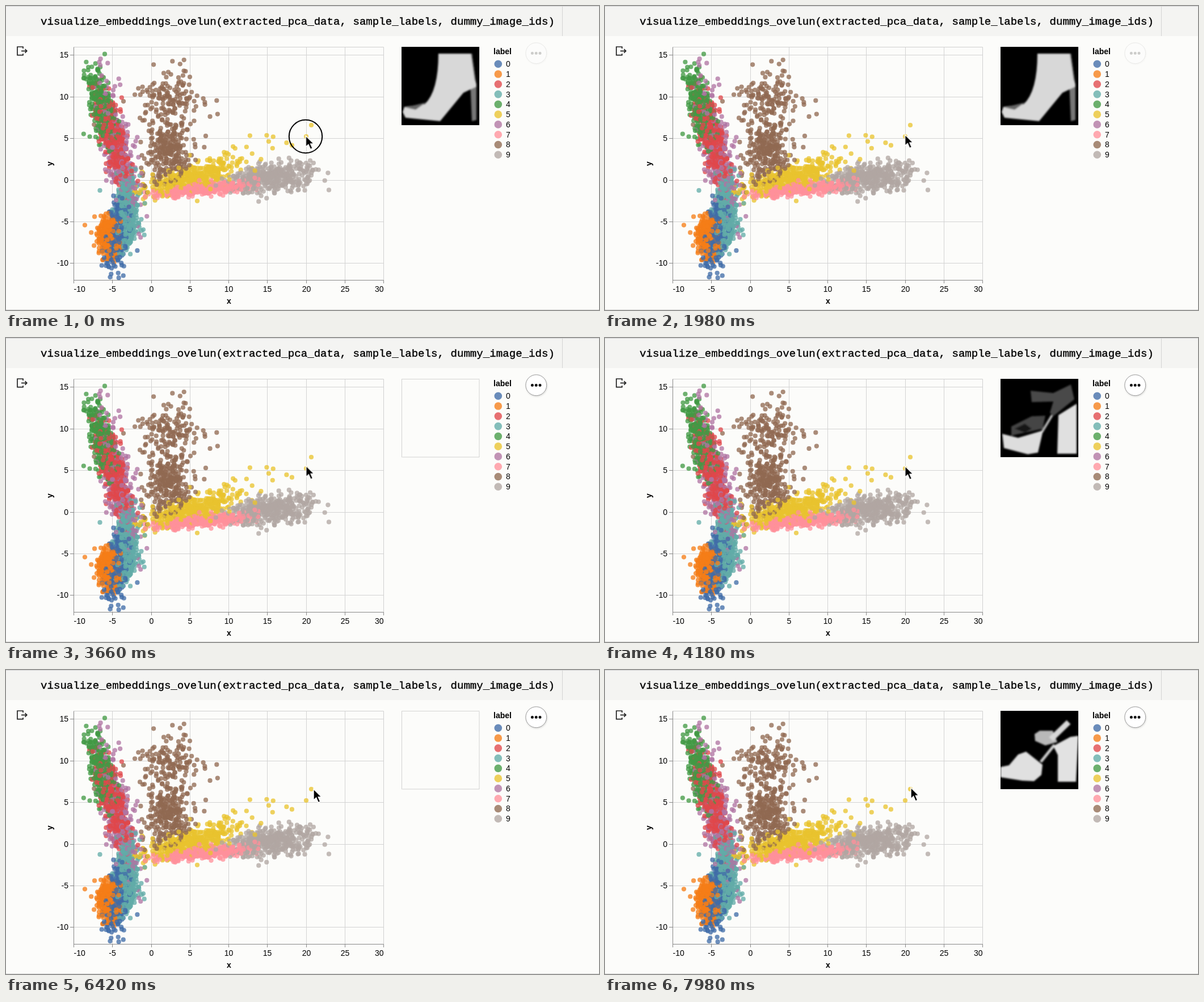
These frames come from a looping animation (1045 px wide and 536 px high, 8000 ms). An HTML page with a canvas:

```html
<!DOCTYPE html>
<html lang="en">
<head>
<meta charset="utf-8">
<title>Embedding scatter plot</title>
<style>
  html, body { margin: 0; width: 100%; height: 100%; overflow: hidden; background: #fcfcfa; }
  svg, canvas { position: absolute; left: 0; top: 0; width: 1045px; height: 536px; }
  text { font: 14px "Liberation Sans", Arial, sans-serif; fill: #000; }
  .bold { font-weight: bold; }
  .code { font: 19.13px "Liberation Mono", "Courier New", monospace; stroke: #000; stroke-width: .35; white-space: pre; }
  .photo { opacity: 0; }
</style>
</head>
<body>
<svg id="chart" viewBox="0 0 1045 536">
  <rect width="1045" height="53" fill="#f4f4f2"/>
  <path d="M0 .5H1045M980.5 0V53" stroke="#d4d4d4"/>
  <path d="M0 535.5H1045" stroke="#bbb" stroke-dasharray="1 1"/>
  <text class="code" x="61" y="33">visualize_embeddings_ovelun(extracted_pca_data, sample_labels, dummy_image_ids)</text>
  <path d="M30 75V72H20V86.7H30V84M27 79.3H36.5M33.5 76L36.8 79.3L33.5 82.6" fill="none" stroke="#222" stroke-width="1.7"/>
  <text class="bold" x="393" y="525" text-anchor="middle">x</text>
  <text class="bold" transform="translate(82 278) rotate(-90)" text-anchor="middle">y</text>
  <text class="bold" x="859" y="85">label</text>
</svg>
<canvas id="dots" width="1045" height="536"></canvas>
<svg viewBox="0 0 1045 536">
  <defs>
    <filter id="soft"><feGaussianBlur stdDeviation="1.6"/></filter>
    <clipPath id="thumb"><rect x="697" y="72" width="136.5" height="137.5"/></clipPath>
  </defs>
  <rect x="697.5" y="72.5" width="136.5" height="137.5" fill="none" stroke="#aaa" stroke-dasharray="1 1"/>

  <g id="boot" class="photo" clip-path="url(#thumb)">
    <rect x="697" y="72" width="137" height="138"/>
    <g filter="url(#soft)">
      <path d="M818 132L829 136V201L821 203Z" fill="#777"/>
      <path d="M762 84H821L829 142L806 153L765 203L704 197L699 187L702 178L738 173Q762 150 762 84Z" fill="#d8d8d8"/>
      <path d="M704 179L740 170L722 183Z" fill="#666"/>
      <path d="M820 84L827 132" stroke="#777" stroke-width="2"/>
    </g>
  </g>

  <g id="sandal" class="photo" clip-path="url(#thumb)">
    <rect x="697" y="72" width="137" height="138"/>
    <g filter="url(#soft)">
      <path d="M750 93L790 97L821 82L827 108L791 137L784 132L790 112L752 113Z" fill="#484848"/>
      <path d="M716 156L752 138L776 137L771 160L716 172Z" fill="#444"/>
      <path d="M722 160L740 151L752 160L740 167Z" fill="#191919"/>
      <path d="M770 166L788 136" stroke="#bbb" stroke-width="4"/>
      <path d="M700 169L728 176L772 163L763 202L745 205L703 194Z" fill="#ddd"/>
      <path d="M799 136L831 116V204H797Z" fill="#e0e0e0"/>
    </g>
  </g>

  <g id="mule" class="photo" clip-path="url(#thumb)">
    <rect x="697" y="72" width="137" height="138"/>
    <g filter="url(#soft)">
      <path d="M768 162L792 132" stroke="#ccc" stroke-width="5"/>
      <path d="M757 113L766 107L789 107L797 127L776 133L758 125Z" fill="#b8b8b8"/>
      <path d="M786 122L817 92" stroke="#d8d8d8" stroke-width="10"/>
      <path d="M697 171L712 168L728 149L742 144L771 167L769 185L756 196L735 195L697 189Z" fill="#e0e0e0"/>
      <path d="M790 134L820 118L834 116L830 197H798V150Z" fill="#e2e2e2"/>
    </g>
  </g>

  <g id="menu">
    <circle cx="935" cy="84.5" r="19" opacity=".13" filter="url(#soft)"/>
    <circle cx="934.3" cy="83.2" r="18.4" fill="#fff" stroke="#999"/>
    <path d="M927.4 83.2h0m6.8 0h0m6.8 0h0" stroke="#111" stroke-width="5" stroke-linecap="round"/>
  </g>
  <circle id="ring" cx="528" cy="230" r="29.2" fill="none" stroke="#000" stroke-width="2"/>
  <g id="cursor">
    <path d="M0 0V19.5L4.6 15.3L8.2 23.6L11.8 22L8.3 14H14.2Z" stroke="#fff" stroke-width="1.4"/>
  </g>
</svg>
<script>
const LOOP = 8000;
const byId = id => document.getElementById(id);
const colors = ['#406ca8', '#f57d18', '#e0484c', '#61aca8', '#439a45',
                '#e9c32f', '#b074a2', '#ff919b', '#906a52', '#b1a7a3'];

// Axes, grid and legend
const chart = byId('chart');
function add(tag, attrs, label) {
  const el = document.createElementNS(chart.namespaceURI, tag);
  for (const key in attrs) el.setAttribute(key, attrs[key]);
  if (label !== undefined) el.textContent = label;
  chart.append(el);
}
const line = (d, stroke) => add('path', { d, stroke, fill: 'none' });
const snap = v => Math.floor(v) + 0.5;
const px = x => snap(256 + x * 13.65);
const py = y => snap(307 - y * 14.67);

for (let x = -10; x <= 30; x += 5) {
  const anchor = x === -10 ? 'start' : x === 30 ? 'end' : 'middle';
  line(`M${px(x)} 73V483`, '#d3d3d3');
  line(`M${px(x)} 483V489`, '#888');
  add('text', { x: px(x), y: 504, 'text-anchor': anchor }, x);
}
for (let y = -10; y <= 15; y += 5) {
  line(`M119 ${py(y)}H666`, '#d3d3d3');
  line(`M113 ${py(y)}H119`, '#888');
  add('text', { x: 110, y: py(y) + 4.5, 'text-anchor': 'end' }, y);
}
line('M119.5 72.5H665.5V483.5', '#d0d0d0');
line('M119.5 72.5V483.5H665.5', '#888');
colors.forEach((fill, i) => {
  const cy = 102.3 + i * 17.77;
  add('circle', { cx: 867.3, cy, r: 6.8, fill, opacity: 0.78 });
  add('text', { x: 881, y: cy + 5 }, i);
});

// Seeded clouds, one per label, drawn in random order
let seed = 20;
function rand() {
  seed = (seed * 1664525 + 1013904223) % 4294967296;
  return seed / 4294967296;
}
const gauss = () => (rand() + rand() + rand() - 1.5) * 2;
const points = [];

// A tilted bell-shaped cloud in which a few points stray sideways
function cloud(label, count, x, y, length, width, degrees) {
  const c = Math.cos(degrees * Math.PI / 180), s = Math.sin(degrees * Math.PI / 180);
  for (let i = 0; i < count; i++) {
    const stray = rand() < 0.07 ? 1 + rand() * 1.5 : 1;
    const a = gauss() * length, b = gauss() * width * stray;
    points.push({ x: x + a * c - b * s, y: y + a * s + b * c, label, order: rand() });
  }
}
cloud(0, 300, 196, 402, 32, 9, 98);
cloud(1, 360, 182, 406, 18, 9, 85);
cloud(2, 460, 190, 235, 42, 10, 75);
cloud(3, 380, 213, 362, 33, 10, 92);
cloud(4, 380, 169, 180, 34, 9, 76);
cloud(5, 400, 322, 305, 42, 11, -16);
cloud(6, 260, 198, 255, 62, 12, 78);
cloud(7, 360, 345, 323, 43, 4.5, -6);
cloud(8, 190, 286, 178, 35, 31, 90);
cloud(8, 240, 284, 262, 26, 19, 90);
cloud(9, 430, 466, 303, 37, 12, -6);
cloud(5, 25, 425, 262, 38, 18, -15);
points.sort((a, b) => a.order - b.order);
// The two dots the pointer visits
points.push({ x: 529, y: 230, label: 5 }, { x: 538, y: 210, label: 5 });

const ctx = byId('dots').getContext('2d');
ctx.globalAlpha = 0.77;
for (const p of points) {
  ctx.fillStyle = colors[p.label];
  ctx.beginPath();
  ctx.arc(p.x, p.y, 4.1, 0, Math.PI * 2);
  ctx.fill();
}

// Timeline: steps are [ms, value, easing to the next step]
function play(id, prop, steps) {
  const last = steps[steps.length - 1];
  const frames = [...steps, [LOOP, last[1]]].map(([ms, value, easing = 'linear']) =>
    ({ offset: ms / LOOP, [prop]: value, easing }));
  byId(id).animate(frames, { duration: LOOP, iterations: Infinity });
}
function show(id, from, to) {
  const cut = (ms, value) => [ms, value, 'steps(1, end)'];
  const steps = from ? [cut(0, 0), cut(from, 1)] : [cut(0, 1)];
  if (to < LOOP) steps.push(cut(to, 0));
  play(id, 'opacity', steps);
}
// Each move: start and end time, then where the pointer comes to rest
function glide(id, x, y, moves) {
  const place = () => `translate(${x}px, ${y}px)`;
  const steps = [[0, place()]];
  for (const [start, end, nextX, nextY] of moves) {
    steps.push([start, place(), 'ease-in-out']);
    x = nextX;
    y = nextY;
    steps.push([end, place()]);
  }
  play(id, 'transform', steps);
}

show('ring', 0, 300);
show('boot', 0, 2300);
show('sandal', 3700, 5880);
show('mule', 7580, LOOP);
play('menu', 'opacity', [[0, 0.2], [2200, 0.2, 'ease-in'], [2600, 1]]);
glide('cursor', 528.3, 229, [
  [1000, 1500, 528.6, 227],
  [2150, 2500, 528.7, 224],
  [3400, 3800, 528.7, 226],
  [5300, 6150, 542, 210],
  [6800, 7500, 539, 207.5]
]);
</script>
</body>
</html>
```
